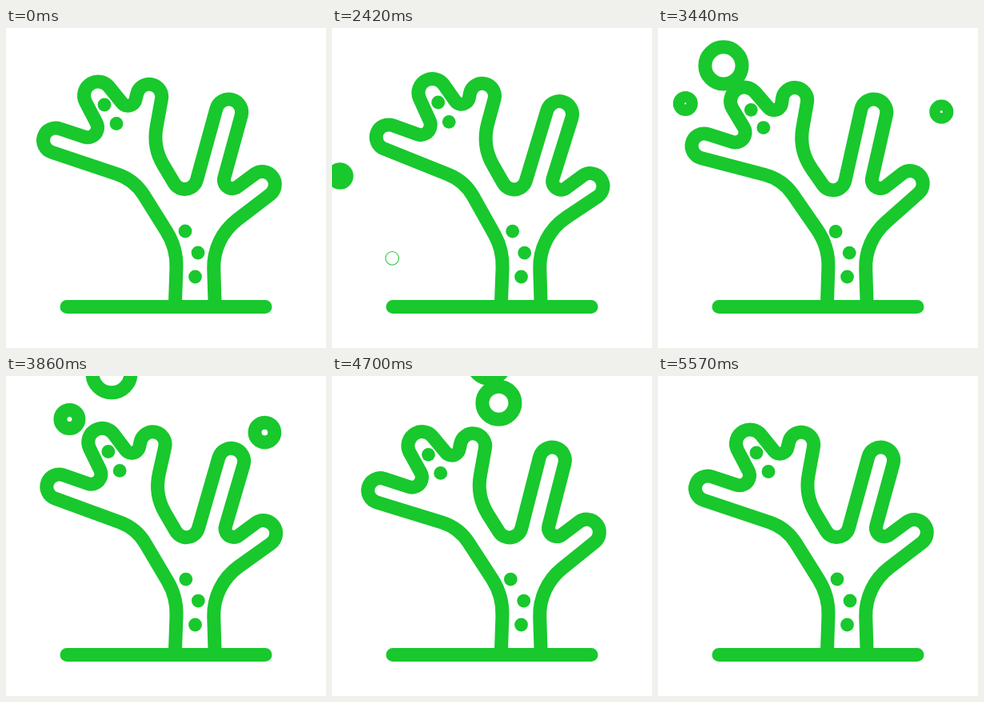
An HTML page with a canvas for the animation above (5780 ms loop, 400x400 px).

```html
<!DOCTYPE html>
<html lang="en">
<head>
<meta charset="utf-8">
<title>Coral</title>
<style>
  html, body { margin: 0; width: 100%; height: 100%; overflow: hidden; background: #fff; }
  canvas { display: block; width: 400px; height: 400px; }
</style>
</head>
<body>
<canvas id="stage"></canvas>
<script>
const LOOP = 5780, START = 2030, STOP = 5570, STEP = 30;
const GREEN = '#18c82d', STROKE = 17, TURN = 2 * Math.PI;

const canvas = document.getElementById('stage');
const ctx = canvas.getContext('2d');
const scale = window.devicePixelRatio || 1;
canvas.width = canvas.height = 400 * scale;

// The outline is a belt around circles: x, y, radius (negative turns left).
const belt = [
  [211.5, 342, 0], [133, 297, -80], [119.5, 241.5, -62],  // trunk and elbow
  [62, 140.5, 15.5], [102, 124.3, -12.5],                 // fingertips and gaps
  [115, 84.5, 17.5], [152.5, 87.5, -9.7],
  [179, 86, 15.7], [256, 136, -69], [223.5, 186, -15.5],
  [278.5, 105.3, 16.2], [283, 190, -10.6],
  [320.3, 195.5, 16], [334.7, 299, -75], [261, 342, 0]
];
const dots = [[123, 96], [138, 119.5], [224, 254], [240, 281], [236.5, 311]];

// time, sway
const sway = [[0, 0], [620, 1.25], [1350, -1.1], [2170, 1.2], [2970, -0.93], [3600, 0]];

// fill: time until the line is full; path: cubic curve, x then y
const bubbles = [
  { born: 120, end: 2100, fill: 300, size: 24, x: [2, 13, 67, 166], y: [230, 129, 42, -30] },
  { born: 340, end: 2860, fill: 1300, size: 20.5, x: [92, -97, 125, 215], y: [312, 50, 64.5, -35] },
  { born: 900, end: 3560, fill: 680, size: 20.5, x: [326, 456, 117, 157], y: [185, 9, 79, -31] }
];

function swayAt(t) {
  const i = sway.findIndex(key => key[0] > t);
  const [t0, a] = sway[i - 1], [t1, b] = sway[i];
  return a + (b - a) * (1 - Math.cos(Math.PI * (t - t0) / (t1 - t0))) / 2;
}

function cubic([a, b, c, d], p) {
  const q = 1 - p;
  return q * q * q * a + 3 * q * q * p * b + 3 * q * p * p * c + p * p * p * d;
}

// Lean the coral; height above the foot sets how far a point goes.
function lean([x, y], s) {
  const h = Math.max(0, (300 - y) / 200), u = (x - 225) / 190, k = Math.abs(s) * h;
  return s > 0
    ? [x + k * (7.5 - 4.5 * u), y + k * (0.7 + 7 * u)]
    : [x - k * (8 + 3 * u), y + k * (2 - 7.5 * u)];
}

// Heading of the straight run that leaves circle a and touches circle b.
function heading([ax, ay, ar], [bx, by, br]) {
  const dx = bx - ax, dy = by - ay;
  return Math.atan2(dy, dx) + Math.asin((ar - br) / Math.hypot(dx, dy));
}

function traceBelt(s) {
  const wheels = belt.map(w => [...lean(w, s), w[2]]);
  const last = wheels.length - 1;
  ctx.moveTo(...wheels[0].slice(0, 2));
  for (let i = 1; i < last; i++) {
    const [x, y, r] = wheels[i];
    const side = r > 0 ? -TURN / 4 : TURN / 4;
    ctx.arc(x, y, Math.abs(r), heading(wheels[i - 1], wheels[i]) + side,
      heading(wheels[i], wheels[i + 1]) + side, r < 0);
  }
  ctx.lineTo(...wheels[last].slice(0, 2));
}

function drawCoral(s) {
  ctx.lineWidth = STROKE;
  ctx.beginPath();
  traceBelt(s);
  ctx.moveTo(76, 348.5);
  ctx.lineTo(324, 348.5);
  ctx.stroke();
  for (const dot of dots) {
    ctx.beginPath();
    ctx.arc(...lean(dot, s), 8.4, 0, TURN);
    ctx.fill();
  }
}

// The ring thickens first, then widens.
function drawBubble({ born, end, fill, size, x, y }, t) {
  if (t <= born || t >= end) return;
  const age = t - born, p = age / (end - born);
  const radius = Math.min(size, 8.3 + 0.0145 * Math.max(0, age - fill));
  ctx.lineWidth = STROKE * Math.min(1, age / fill);
  ctx.beginPath();
  ctx.arc(cubic(x, p), cubic(y, p), radius, 0, TURN);
  ctx.stroke();
}

function draw(time) {
  const active = time >= START && time < STOP;
  const t = active ? (Math.floor((time - START) / STEP) + 1) * STEP : 0;
  ctx.setTransform(scale, 0, 0, scale, 0, 0);
  ctx.fillStyle = '#fff';
  ctx.fillRect(0, 0, 400, 400);
  ctx.fillStyle = ctx.strokeStyle = GREEN;
  ctx.lineCap = ctx.lineJoin = 'round';
  drawCoral(swayAt(t));
  for (const bubble of bubbles) drawBubble(bubble, t);
}

const origin = performance.now();
function tick() {
  draw((performance.now() - origin) % LOOP);
  requestAnimationFrame(tick);
}
tick();
</script>
</body>
</html>
```
